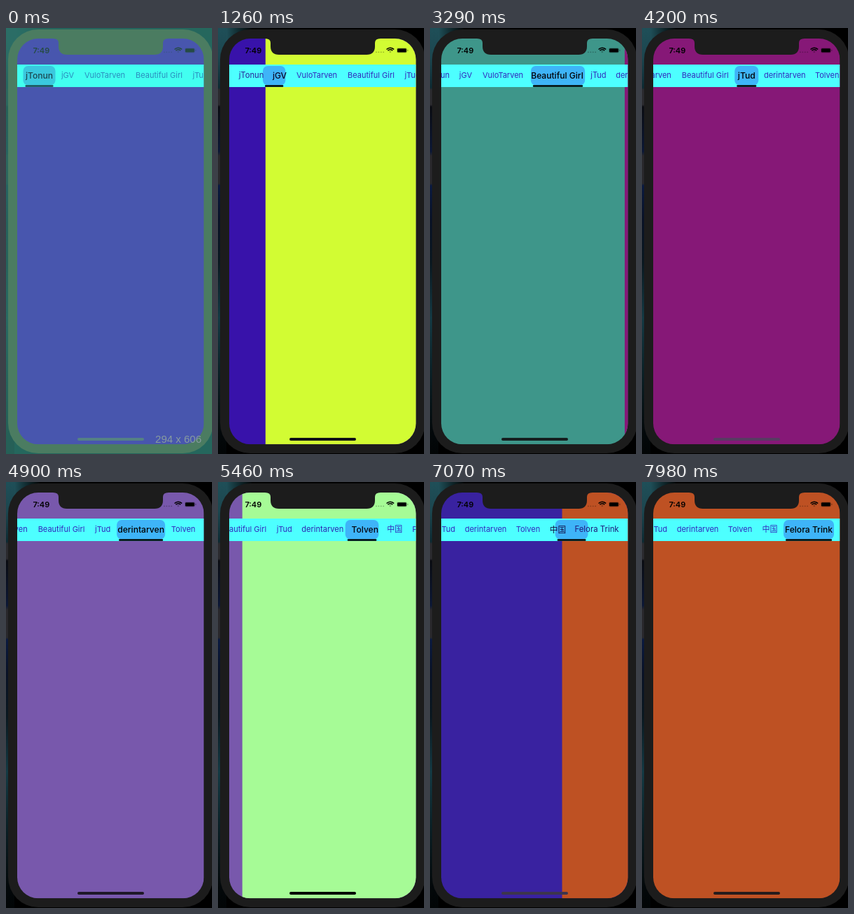
An HTML page with a canvas for the animation above (8000 ms loop, 294 by 606 pixels).

```html
<!DOCTYPE html>
<html lang="en">
<head>
<meta charset="utf-8">
<title>Paged tabs</title>
<style>
html, body { margin: 0; width: 100%; height: 100%; overflow: hidden; background: #000; }
canvas { display: block; width: 294px; height: 606px; }
</style>
</head>
<body>
<canvas id="stage"></canvas>
<script>
const W = 294, H = 606, LOOP = 8000;
const SCREEN = { x: 16, y: 15, w: 266.5, h: 577.3 };
const MID = SCREEN.x + SCREEN.w / 2;
const GAP = 14;
const FONT = 'Inter, "Noto Sans CJK SC", "Noto Sans CJK", sans-serif';

// [normal, under the opening tint]
const INK = [[0, 0, 0], [28, 72, 82]];
const LINK = [[50, 40, 190], [44, 140, 190]];
const BAR = [[77, 255, 255], [66, 255, 240]];
const BLOCK = [[62, 180, 248], [58, 200, 222]];
const BEZEL = [[28, 28, 28], [60, 79, 47]];

// label, label width, page colour, home indicator colour
const tabs = [
  ['jTonun', 35, [56, 18, 170], [76, 86, 104]],
  ['jGV', 18, [210, 252, 51], [0, 0, 0]],
  ['VuloTarven', 60, [136, 35, 75], [50, 34, 44]],
  ['Beautiful Girl', 67, [62, 150, 138], [20, 30, 30]],
  ['jTud', 23, [134, 24, 119], [88, 58, 98]],
  ['derintarven', 58, [120, 88, 172], [30, 24, 40]],
  ['Tolven', 35, [166, 251, 150], [0, 0, 0]],
  ['中国', 22, [57, 34, 160], [74, 66, 104]],
  ['Felora Trink', 61, [190, 81, 35], [38, 28, 28]]
].map(([text, w, page, home]) => ({ text, w, page, home }));

let end = 30;
for (const tab of tabs) {
  tab.x = end;
  end += tab.w + GAP;
}
const maxScroll = end - SCREEN.x - SCREEN.w;
for (const tab of tabs) {
  tab.scroll = Math.min(maxScroll, Math.max(0, tab.x + tab.w / 2 - MID));
}

// start of each swipe
const swipes = [896, 1784, 2540, 3270, 4215, 5005, 5949, 6900];
const SWIPE = 650, SETTLE = 280;

const canvas = document.getElementById('stage');
const ctx = canvas.getContext('2d');
const ratio = window.devicePixelRatio || 1;
canvas.width = W * ratio;
canvas.height = H * ratio;

const clamp = v => Math.min(1, Math.max(0, v));
const lerp = (a, b, k) => a + (b - a) * k;
const mix = (a, b, k) => a.map((v, i) => lerp(v, b[i], k));
const rgb = (c, a = 1) => `rgba(${c.map(Math.round).join(',')},${a})`;
const glide = u => 1 - (1 - u ** 1.5) ** 3;
const smooth = u => u * u * (3 - 2 * u);

function pagePosition(t) {
  return swipes.reduce((sum, s) => sum + glide(clamp((t - s) / SWIPE)), 0);
}

// the tab strip recentres once a page has nearly settled
function tabScroll(t) {
  return swipes.reduce((x, s, i) => {
    const k = smooth(clamp((t - s - SWIPE * 0.93) / SETTLE));
    return x + (tabs[i + 1].scroll - tabs[i].scroll) * k;
  }, 0);
}

function box(x, y, w, h, r, fill) {
  ctx.beginPath();
  ctx.roundRect(x, y, w, h, r);
  ctx.fillStyle = fill;
  ctx.fill();
}

function desktop(tint) {
  ctx.fillStyle = rgb([0, 45 * tint, 40 * tint]);
  ctx.fillRect(0, 0, W, H);
  const g = ctx.createLinearGradient(0, 0, 0, H);
  [[0, '#1f4f58'], [0.07, '#1c464f'], [0.14, '#0d2a32'], [0.145, '#2b2b2f'],
   [0.18, '#2b2b2f'], [0.185, '#0a0c12'], [0.29, '#0c1836'], [0.3, '#29282c'],
   [0.365, '#29282c'], [0.37, '#0a1a40'], [0.45, '#091226'], [0.55, '#0a1820'],
   [0.68, '#143a44'], [0.8, '#0b2228'], [0.95, '#03080a'], [1, '#020506']
  ].forEach(([at, c]) => g.addColorStop(at, c));
  ctx.globalAlpha = 1 - tint * 0.7;
  ctx.fillStyle = g;
  ctx.fillRect(0, 0, 12, H);
  const corner = ctx.createLinearGradient(12, 0, 50, 0);
  corner.addColorStop(0, '#1f4f58');
  corner.addColorStop(1, 'rgba(31,79,88,0)');
  ctx.fillStyle = corner;
  ctx.fillRect(12, 0, 38, 50);
  ctx.globalAlpha = 1;
}

function pages(pos) {
  const i = Math.floor(pos);
  const edge = SCREEN.x + SCREEN.w * (1 - (pos - i));
  ctx.fillStyle = rgb(tabs[i].page);
  ctx.fillRect(SCREEN.x, SCREEN.y, SCREEN.w, SCREEN.h);
  if (pos > i && tabs[i + 1]) {
    ctx.fillStyle = rgb(tabs[i + 1].page);
    ctx.fillRect(edge, SCREEN.y, SCREEN.w, SCREEN.h);
  }
}

function tabBar(pos, scroll, tint) {
  const ink = mix(...INK, tint), link = mix(...LINK, tint);
  ctx.save();
  ctx.beginPath();
  ctx.rect(SCREEN.x, 52, SCREEN.w, 32);
  ctx.clip();
  ctx.fillStyle = rgb(mix(...BAR, tint));
  ctx.fillRect(SCREEN.x, 52, SCREEN.w, 32);
  ctx.translate(-scroll, 0);

  const i = Math.floor(pos), k = pos - i;
  const from = tabs[i], to = tabs[i + 1] || from;
  const x = lerp(from.x, to.x, k) - 5.5;
  const w = lerp(from.w, to.w, k) + 11;
  box(x, 54, w, 27.5, 7, rgb(mix(...BLOCK, tint)));
  box(x + 3, 81.3, w - 6, 2.4, 1, rgb(ink));

  ctx.textAlign = 'center';
  ctx.textBaseline = 'alphabetic';
  tabs.forEach((tab, n) => {
    const on = clamp(1 - Math.abs(pos - n));
    ctx.save();
    ctx.translate(tab.x + tab.w / 2, 67.5);
    ctx.scale(1 + on * 0.1, 1 + on * 0.1);
    ctx.font = `${on > 0.5 ? 500 : 400} 11px ${FONT}`;
    ctx.fillStyle = rgb(mix(link, ink, on));
    ctx.fillText(tab.text, 0, 3.8);
    ctx.restore();
  });
  ctx.restore();
}

function statusBar() {
  ctx.fillStyle = '#000';
  ctx.font = `600 11px ${FONT}`;
  ctx.textAlign = 'center';
  ctx.textBaseline = 'alphabetic';
  ctx.fillText('7:49', 50.3, 35.8);

  for (let i = 0; i < 4; i++) {
    box(225 + i * 3.4, 33.4, 1.9, 1.9, 1, 'rgba(0,0,0,0.28)');
  }

  ctx.strokeStyle = '#000';
  ctx.lineWidth = 1.5;
  for (const r of [7.2, 4.7]) {
    ctx.beginPath();
    ctx.arc(245.8, 35.4, r, -Math.PI * 0.76, -Math.PI * 0.24);
    ctx.stroke();
  }
  ctx.beginPath();
  ctx.moveTo(245.8, 35.6);
  ctx.arc(245.8, 35.4, 2.6, -Math.PI * 0.76, -Math.PI * 0.24);
  ctx.fill();

  box(255, 28.2, 14.8, 7.2, 2, 'rgba(0,0,0,0.22)');
  box(256, 29.2, 12.8, 5.2, 1.2, '#000');
  box(270.3, 30.6, 1, 2.4, 0.5, 'rgba(0,0,0,0.4)');
}

function notch(fill) {
  ctx.beginPath();
  ctx.moveTo(67, 14);
  ctx.lineTo(67, 15);
  ctx.quadraticCurveTo(75, 15, 75, 21);
  ctx.lineTo(75, 26);
  ctx.quadraticCurveTo(75, 38, 87, 38);
  ctx.lineTo(212, 38);
  ctx.quadraticCurveTo(224, 38, 224, 26);
  ctx.lineTo(224, 21);
  ctx.quadraticCurveTo(224, 15, 232, 15);
  ctx.lineTo(232, 14);
  ctx.closePath();
  ctx.fillStyle = fill;
  ctx.fill();
}

function sizeOverlay(tint) {
  ctx.fillStyle = rgb([100, 200, 180], 0.38 * tint);
  ctx.fillRect(0, 0, W, H);
  ctx.font = '15px "Liberation Sans", Arial, sans-serif';
  ctx.textAlign = 'right';
  ctx.textBaseline = 'alphabetic';
  ctx.fillStyle = rgb([136, 156, 160], tint);
  ctx.fillText('294 x 606', 279, 590);
}

function draw(t) {
  const tint = clamp(1 - t / 210);
  const pos = pagePosition(t);
  const i = Math.floor(pos);
  const next = tabs[i + 1] || tabs[i];
  const bezel = rgb(mix(...BEZEL, tint));

  ctx.setTransform(ratio, 0, 0, ratio, 0, 0);
  desktop(tint);
  box(3, 2, 292.5, 603, 43, bezel);

  ctx.save();
  ctx.beginPath();
  ctx.roundRect(SCREEN.x, SCREEN.y, SCREEN.w, SCREEN.h, 30);
  ctx.clip();
  pages(pos);
  statusBar();
  box(102, 583, 95, 4, 2, rgb(mix(tabs[i].home, next.home, pos - i)));
  ctx.restore();

  notch(bezel);
  if (tint > 0) sizeOverlay(tint);
  tabBar(pos, tabScroll(t), tint);
}

const start = performance.now();
function tick() {
  draw((performance.now() - start) % LOOP);
  requestAnimationFrame(tick);
}
tick();
</script>
</body>
</html>
```
